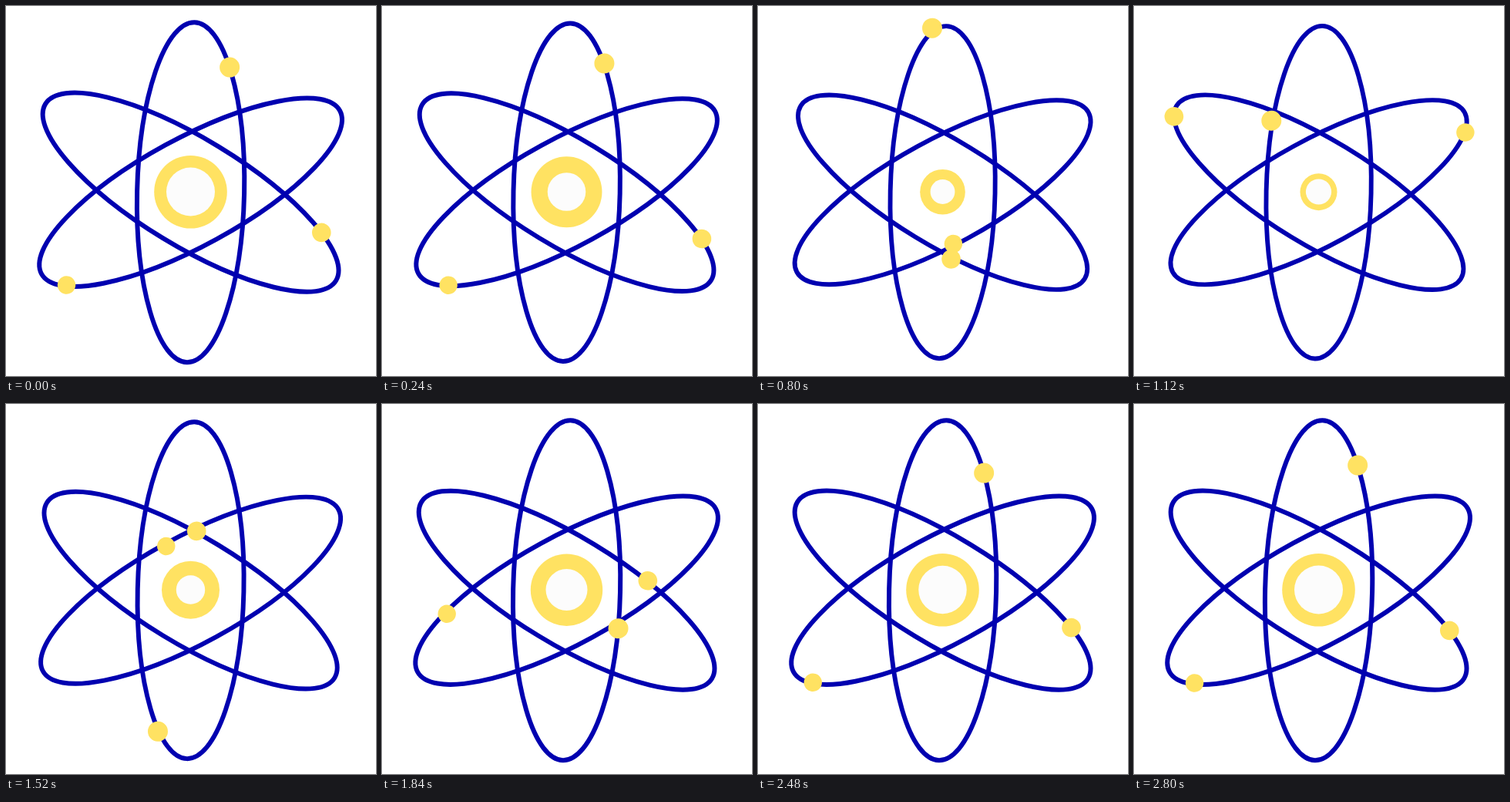
Recreate the animation shown at these times as an HTML page. Size 480 by 480 pixels, loop 2880 ms.

```html
<!DOCTYPE html>
<html lang="en">
<head>
<meta charset="utf-8">
<title>Atom</title>
<style>
  html, body { margin: 0; width: 100%; height: 100%; overflow: hidden; background: #fff; }
  svg { display: block; width: 100%; height: 100%; }
</style>
</head>
<body>
<svg id="stage" viewBox="0 0 480 480"></svg>
<script>
const LOOP = 2880, STEP = 80;
const BLUE = '#0000b0', YELLOW = '#ffe262';
const CX = 239.6, CY = 241.7;
const stage = document.getElementById('stage');

function add(parent, tag, attrs) {
  const el = document.createElementNS('http://www.w3.org/2000/svg', tag);
  for (const k in attrs) el.setAttribute(k, attrs[k]);
  return parent.appendChild(el);
}

// Smooth curve through points that never overshoots them, flat at both ends.
function track(xs, ys) {
  const n = xs.length;
  const d = xs.slice(1).map((x, i) => (ys[i + 1] - ys[i]) / (x - xs[i]));
  const m = xs.map((_, i) => {
    if (i === 0 || i === n - 1) return 0;
    const a = d[i - 1], b = d[i];
    return a * b <= 0 ? 0 : 2 * a * b / (a + b);
  });
  return t => {
    if (t >= xs[n - 1]) return ys[n - 1];
    let i = 0;
    while (t >= xs[i + 1]) i++;
    const h = xs[i + 1] - xs[i], u = (t - xs[i]) / h, v = 1 - u;
    return ys[i] * v * v * (1 + 2 * u) + ys[i + 1] * u * u * (3 - 2 * u)
      + h * u * v * (m[i] * v - m[i + 1] * u);
  };
}

// Time warp fed to a smoothstep: one eased lap per loop.
function lap(values) {
  const xs = [-480, 0, 480, 1120, 1520, 1840, 2160, 2800, 3200];
  const warp = track(xs, [-0.05, 0, ...values, 1, 1.0001]);
  return t => {
    const q = Math.min(1, Math.max(0, warp(t)));
    return q * q * (3 - 2 * q);
  };
}

const ringScale = track(
  [0, 480, 880, 1120, 1520, 1840, 2000],
  [1, 0.9855, 0.977, 0.9785, 0.9905, 0.9995, 1]);
const coreOuter = track(
  [0, 160, 480, 1040, 1120, 1520, 1840, 2160],
  [47.3, 46.7, 41.5, 23.5, 24, 37.5, 46.7, 47.3]);
const coreInner = track(
  [0, 480, 800, 1120, 1520, 1840, 2160, 2800],
  [31.5, 17.2, 15.9, 16.6, 18.7, 27, 30.6, 31.5]);

// a, b, shift: electron path; start: position along it as part of a lap.
const orbits = [
  { angle: -88.7, a: 220.5, b: 69.7, shift: 0, r: 13, dir: -1, start: 0.0801,
    lap: lap([0.1012, 0.3155, 0.5153, 0.6975, 0.826]) },
  { angle: 31.3, a: 217, b: 70.5, shift: 1.5, r: 12.3, dir: 1, start: -0.0696,
    lap: lap([0.15, 0.5366, 0.6995, 0.8095, 0.886]) },
  { angle: -28.7, a: 219.5, b: 65.5, shift: -1, r: 11.7, dir: -1, start: 0.4616,
    lap: lap([0.1287, 0.4547, 0.6447, 0.7732, 0.859]) }
];

const rings = add(stage, 'g', { fill: 'none', stroke: BLUE, 'stroke-width': 6 });
const outer = add(stage, 'circle', { cx: 239.5, cy: 241.2, fill: YELLOW });
const inner = add(stage, 'circle', { cx: 239.5, cy: 241, fill: '#fcfcfc' });

for (const o of orbits) {
  add(rings, 'ellipse', { rx: 220.6, ry: 69.5, transform: `rotate(${o.angle})` });
  const g = add(stage, 'g', { transform: `translate(${CX} ${CY}) rotate(${o.angle})` });
  o.dot = add(g, 'circle', { r: o.r, fill: YELLOW });
  o.arc = arcTable(o.a, o.b);
}

// Arc length by eccentric angle, so that speed is measured along the curve.
function arcTable(a, b) {
  const n = 720, sum = [0];
  for (let i = 0; i < n; i++) {
    const e = (i + 0.5) * 2 * Math.PI / n;
    sum.push(sum[i] + Math.hypot(a * Math.sin(e), b * Math.cos(e)));
  }
  return part => {
    const want = (part - Math.floor(part)) * sum[n];
    let i = 0;
    while (i < n - 1 && sum[i + 1] <= want) i++;
    return (i + (want - sum[i]) / (sum[i + 1] - sum[i])) * 2 * Math.PI / n;
  };
}

function draw(t) {
  rings.setAttribute('transform', `translate(${CX} ${CY}) scale(${ringScale(t)})`);
  outer.setAttribute('r', coreOuter(t));
  inner.setAttribute('r', coreInner(t));
  for (const o of orbits) {
    const e = o.arc(o.start + o.dir * o.lap(t));
    o.dot.setAttribute('cx', o.shift + o.a * Math.cos(e));
    o.dot.setAttribute('cy', o.b * Math.sin(e));
  }
}

const t0 = performance.now();
function tick() {
  const t = Math.max(0, performance.now() - t0) % LOOP;
  draw(Math.floor(t / STEP) * STEP);
  requestAnimationFrame(tick);
}
tick();
</script>
</body>
</html>
```
